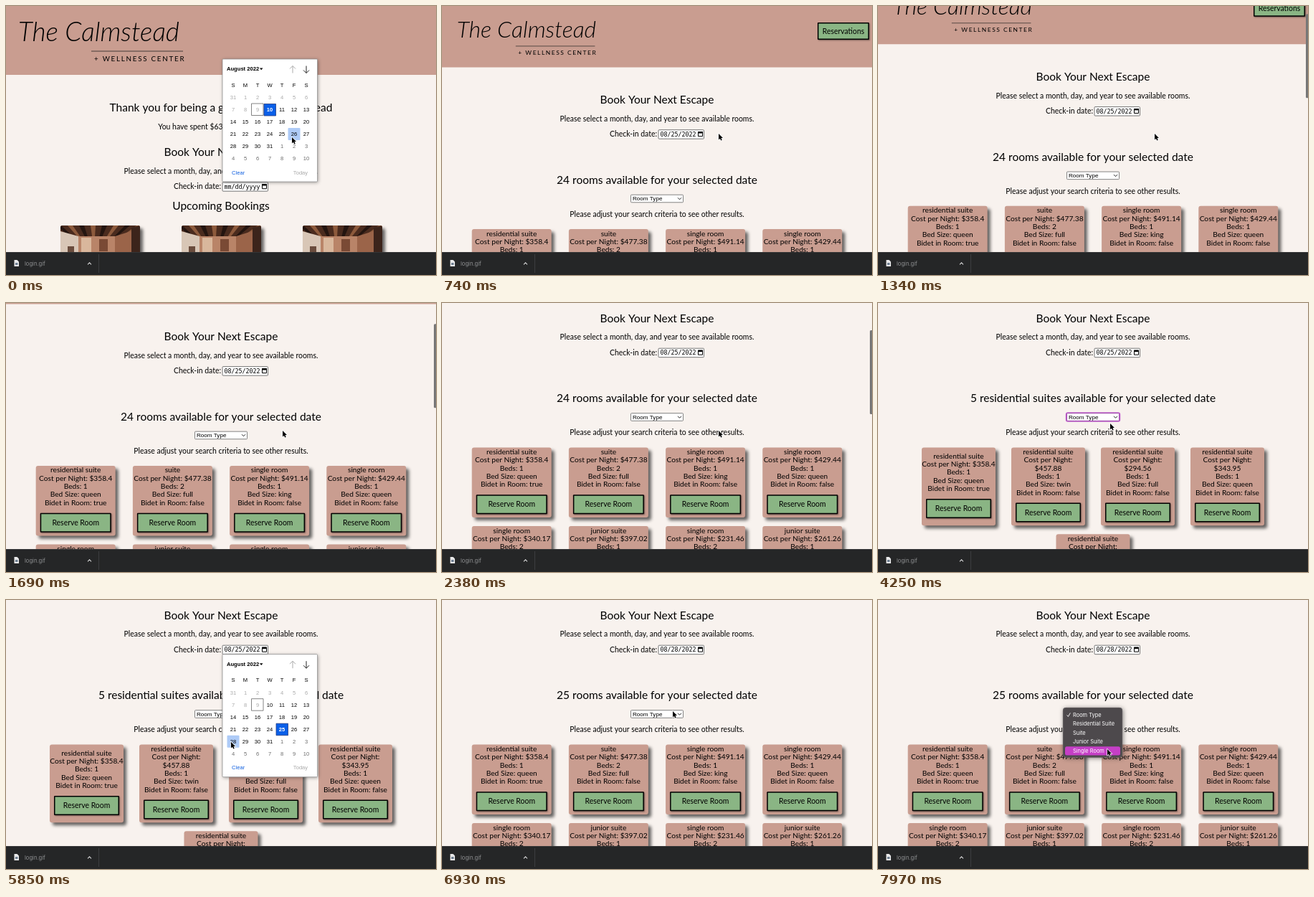
Recreate the animation shown at these times as an HTML page with a canvas. Size 600 by 375 pixels, loop 8 s.

```html
<!DOCTYPE html>
<html lang="en">
<head>
<meta charset="utf-8">
<title>Room booking</title>
<style>
html, body { margin: 0; width: 100%; height: 100%; overflow: hidden; background: #f8f2ee; }
canvas { display: block; width: 600px; height: 375px; }
</style>
</head>
<body>
<canvas id="stage" width="600" height="375"></canvas>
<script>
const ctx = document.getElementById('stage').getContext('2d');
const LOOP = 8000;
const PAGE = '#f8f2ee', ROSE = '#c99d90', GREEN = '#8ab584';
const LATO = 'Lato, sans-serif', ARIAL = '"Liberation Sans", sans-serif';
const UI = 'Inter, sans-serif', MONO = '"DejaVu Sans Mono", monospace';
const BODY = 10.45, TITLE = 15.5, LINE = 11.3;

const PICK_FIRST = 450, PICK_TYPE = 3950, PICK_SECOND = 6150;
const MENU_1 = 3250, CALENDAR_2 = 5350, MENU_2 = 7150;
const BAR_TOP = 343;

const scrollKeys = [[1040, 0], [1340, 32], [1690, 84], [2000, 106], [2150, 109.5]];
const cursorKeys = [
  [80, 399, 183], [250, 386, 178], [2700, 386, 178], [3180, 330, 157], [3350, 330, 157],
  [3700, 324, 168], [4350, 324, 168], [5080, 357, 82], [5240, 361, 66], [5400, 361, 66],
  [5800, 314, 198], [6200, 314, 198], [6780, 322, 155], [7250, 322, 155], [7900, 320, 208]
];

const allRooms = [
  ['residential suite', '$358.4', 1, 'queen', true],
  ['suite', '$477.38', 2, 'full', false],
  ['single room', '$491.14', 1, 'king', false],
  ['single room', '$429.44', 1, 'queen', false],
  ['single room', '$340.17', 2, 'queen', false],
  ['junior suite', '$397.02', 1, 'queen', false],
  ['single room', '$231.46', 2, 'twin', false],
  ['junior suite', '$261.26', 1, 'full', false]
];
const suites = [
  allRooms[0],
  ['residential suite', '$457.88', 1, 'twin', false],
  ['residential suite', '$294.56', 1, 'full', false],
  ['residential suite', '$343.95', 1, 'queen', false],
  ['residential suite', '$412.73', 1, 'king', false]
];

const clamp = v => Math.max(0, Math.min(1, v));
const smooth = p => p * p * (3 - 2 * p);

// Value list at time t along [time, ...values] keys.
function along(keys, t, ease = p => p) {
  if (t <= keys[0][0]) return keys[0].slice(1);
  for (let i = 1; i < keys.length; i++) {
    const a = keys[i - 1], b = keys[i];
    if (t < b[0]) {
      const p = ease((t - a[0]) / (b[0] - a[0]));
      return a.slice(1).map((v, k) => v + (b[k + 1] - v) * p);
    }
  }
  return keys[keys.length - 1].slice(1);
}

// Text centred vertically on y.
function text(str, x, y, { size = BODY, font = LATO, color = '#000', align = 'center', style = '', spacing = 0 } = {}) {
  ctx.font = `${style} ${size}px ${font}`;
  ctx.letterSpacing = spacing + 'px';
  ctx.textAlign = align;
  ctx.fillStyle = color;
  ctx.fillText(str, x, y + size * 0.35);
}

function box(x, y, w, h, fill, { radius = 0, stroke, width = 1 } = {}) {
  ctx.beginPath();
  ctx.roundRect(x, y, w, h, radius);
  if (fill) { ctx.fillStyle = fill; ctx.fill(); }
  if (stroke) { ctx.strokeStyle = stroke; ctx.lineWidth = width; ctx.stroke(); }
}

function line(points, color, width = 1) {
  ctx.beginPath();
  points.forEach(([x, y]) => ctx.lineTo(x, y));
  ctx.strokeStyle = color;
  ctx.lineWidth = width;
  ctx.stroke();
}

function shape(points, fill) {
  ctx.beginPath();
  points.forEach(([x, y]) => ctx.lineTo(x, y));
  ctx.closePath();
  ctx.fillStyle = fill;
  ctx.fill();
}

function withShadow(offset, blur, color, draw) {
  ctx.save();
  ctx.shadowOffsetX = ctx.shadowOffsetY = offset;
  ctx.shadowBlur = blur;
  ctx.shadowColor = color;
  draw();
  ctx.restore();
}

function button(label, x, y, w, h) {
  withShadow(1, 2, 'rgba(0,0,0,.45)', () => box(x, y, w, h, '#000', { radius: 1 }));
  box(x + 1.5, y + 1.5, w - 3, h - 3, GREEN);
  text(label, x + w / 2, y + h / 2);
}

function header(home, scroll) {
  const k = home ? 1 : 0.864;
  box(0, -scroll, 600, home ? 96 : 85.5, ROSE);
  ctx.save();
  ctx.translate(0, home ? 0 : 1.5 - scroll);
  ctx.scale(k, k);
  text('The Calmstead', home ? 17 : 24, 36, { size: 37, style: 'italic 300', align: 'left' });
  line([[119, 63], [247, 63]], '#222', 0.8);
  text('+ WELLNESS CENTER', 123, 73.5, { size: 9.8, align: 'left', spacing: 1.75 });
  ctx.restore();
  if (!home) button('Reservations', 524, 23 - scroll, 72, 24);
}

function photo(x, y) {
  const w = 111, h = 80;
  withShadow(4, 4, 'rgba(0,0,0,.6)', () => box(x, y, w, h, '#8a5f48', { radius: 3 }));
  ctx.save();
  ctx.beginPath();
  ctx.roundRect(x, y, w, h, 3);
  ctx.clip();
  ctx.translate(x, y);
  box(0, 0, w, 17, '#4a2b1e');
  for (let i = 0; i < 8; i++) {
    const a = i * 16 - 6;
    shape([[a, 0], [a + 7, 0], [48 + (a - 48) * 0.65 + 4, 15], [48 + (a - 48) * 0.65, 15]], i % 2 ? '#8d5a3c' : '#241510');
  }
  box(0, 15, w, 40, '#b98468');
  shape([[0, 8], [25, 15], [25, 40], [0, 40]], '#d8c6b6');
  box(29, 17, 14, 21, '#d9b79c');
  box(54, 19, 12, 17, '#7a4a35');
  shape([[76, 15], [w, 4], [w, 42], [76, 38]], '#9b6449');
  shape([[99, 3], [w, 0], [w, 42], [99, 40]], '#3c241b');
  box(10, 29, 9, 10, '#6a4c3d');
  ctx.restore();
}

function dateInput(y, value) {
  text('Check-in date:', 300, y, { align: 'right' });
  box(302, y - 6, 63.5, 12.5, '#fff', { stroke: '#767676', radius: 1 });
  text(value, 304.5, y + 0.3, { size: 8.3, font: MONO, align: 'left' });
  box(357.5, y - 3, 6, 6, null, { stroke: '#000' });
  box(357, y - 3.5, 7, 2.3, '#000');
}

function bookingForm(y, value) {
  text('Book Your Next Escape', 300, y, { size: TITLE });
  text('Please select a month, day, and year to see available rooms.', 300, y + 26.2);
  dateInput(y + 47.7, value);
}

function home() {
  header(true, 0);
  text('Thank you for being a guest at The Calmstead', 300, 142, { size: TITLE });
  text('You have spent $6374.28 on bookings', 300, 168);
  bookingForm(204, 'mm/dd/yyyy');
  text('Upcoming Bookings', 300, 279, { size: TITLE });
  [76, 245, 414].forEach(x => photo(x, 306));
}

function card([type, cost, beds, size, bidet], x, y, w, h) {
  withShadow(4, 4, 'rgba(0,0,0,.6)', () => box(x, y, w, h, ROSE, { radius: 3 }));
  const wraps = w < 110 && cost.length > 6;
  const rows = [type, ...(wraps ? ['Cost per Night:', cost] : ['Cost per Night: ' + cost]),
    'Beds: ' + beds, 'Bed Size: ' + size, 'Bidet in Room: ' + bidet];
  const top = y + (h - rows.length * LINE - 41) / 2;
  rows.forEach((row, i) => text(row, x + w / 2, top + 6 + i * LINE, { size: 10.2 }));
  button('Reserve Room', x + 6, top + rows.length * LINE + 9.3, w - 12, 27);
}

function roomGrid(rooms, narrow, top) {
  const w = narrow ? 103 : 111, h = narrow ? 108.8 : 97.5, pitch = narrow ? 125 : 135.2;
  rooms.forEach((room, i) => {
    const row = Math.floor(i / 4);
    const inRow = Math.min(4, rooms.length - row * 4);
    const x = 300 - ((inRow - 1) * pitch + w) / 2 + (i % 4) * pitch;
    card(room, x, top + row * (h + 12), w, h);
  });
}

function results(t, scroll) {
  const narrow = t >= PICK_TYPE && t < PICK_SECOND;
  const found = narrow ? '5 residential suites' : t < PICK_SECOND ? '24 rooms' : '25 rooms';
  header(false, scroll);
  bookingForm(131 - scroll, t < PICK_SECOND ? '08/25/2022' : '08/28/2022');
  text(found + ' available for your selected date', 300, 242.5 - scroll, { size: TITLE });

  const y = 268.5 - scroll;
  const focused = t >= PICK_TYPE && t < CALENDAR_2;
  if (focused) box(263, y - 5.5, 74, 11, null, { stroke: '#c060cc', width: 2.5, radius: 2 });
  box(263.5, y - 5.3, 73, 10.6, '#fff', { stroke: focused ? '#9a45a8' : '#767676', width: 0.9, radius: 1 });
  text('Room Type', 266, y, { size: 8.1, font: ARIAL, align: 'left' });
  line([[329, y - 1.2], [331.5, y + 1.3], [334, y - 1.2]], '#222');

  text('Please adjust your search criteria to see other results.', 300, 290 - scroll);
  roomGrid(narrow ? suites : allRooms, narrow, 311 - scroll);
}

function arrow(x, y, dir, color) {
  line([[x, y - 5 * dir], [x, y + 5 * dir]], color);
  line([[x - 4, y + dir], [x, y + 5 * dir], [x + 4, y + dir]], color);
}

function calendar(top, chosen, [cx, cy]) {
  const small = { size: 7.6, font: ARIAL };
  withShadow(1, 5, 'rgba(0,0,0,.4)', () => box(302, top, 132.5, 171, '#fff', { radius: 1 }));
  box(302, top, 132.5, 171, null, { stroke: '#8a8a8a', width: 0.7, radius: 1 });
  text('August 2022', 308, top + 13.5, { ...small, style: 'bold', align: 'left' });
  shape([[354, top + 12.5], [358.5, top + 12.5], [356.2, top + 15.2]], '#000');
  arrow(400, top + 14.5, -1, '#aaa');
  arrow(419, top + 14.5, 1, '#222');
  [...'SMTWTFS'].forEach((d, i) => text(d, 317 + i * 17, top + 36, small));

  const col = Math.floor((cx - 308.5) / 17), row = Math.floor((cy - top - 45) / 17);
  const hover = col >= 0 && col < 7 && row >= 0 && row < 6 ? row * 7 + col : -1;
  for (let i = 0; i < 42; i++) {
    const x = 317 + (i % 7) * 17, y = top + 53.5 + Math.floor(i / 7) * 17;
    const day = i === 0 ? 31 : i > 31 ? i - 31 : i;
    const picked = i === chosen;
    if (picked) box(x - 8, y - 8, 16.5, 16.5, '#0a5fe8', { stroke: '#263c80', width: 0.8 });
    else if (i === hover && i > 9) box(x - 8.5, y - 8.5, 17, 17, '#aecbf7', { radius: 1 });
    if (i === 9) box(x - 8.5, y - 8.5, 16.5, 16.5, null, { stroke: '#777', width: 0.9 });
    const color = picked ? '#fff' : i <= 9 ? '#aaa' : i > 31 ? '#6c6c6c' : '#000';
    text(day, x, y, { ...small, color, style: picked ? 'bold' : '' });
  }
  text('Clear', 315, top + 158, { ...small, color: '#1060e0', align: 'left' });
  text('Today', 411, top + 158, { ...small, color: '#aaa' });
}

function menu([, cy]) {
  const items = ['Room Type', 'Residential Suite', 'Suite', 'Junior Suite', 'Single Room'];
  const active = Math.max(0, Math.min(4, Math.round((cy - 160) / 12.6)));
  withShadow(1, 6, 'rgba(0,0,0,.5)', () => box(258, 150, 83, 69.5, '#4d494c', { radius: 4 }));
  box(258.3, 150.3, 82.4, 68.9, null, { stroke: '#6c686b', width: 0.6, radius: 4 });
  box(261, 153.8 + active * 12.6, 77, 12.4, '#c53fc6', { radius: 2.5 });
  line([[263.6, 160.4], [265.4, 162.5], [268.3, 157.4]], '#fff', 0.9);
  items.forEach((item, i) => text(item, 272, 160 + i * 12.6, { size: 7.45, font: UI, color: '#fff', align: 'left' }));
}

function scrollbar(t, scroll) {
  ctx.globalAlpha = clamp((t - 1040) / 80) * clamp((3150 - t) / 250);
  box(597, scroll * 0.347, 4, 117, '#777', { radius: 1.5 });
  ctx.globalAlpha = 1;
}

function downloadBar() {
  box(0, BAR_TOP, 600, 32, '#252627');
  box(0, BAR_TOP, 600, 0.7, '#3a3a3b');
  shape([[11.5, 354], [15.5, 354], [18, 356.5], [18, 363], [11.5, 363]], '#e9e9ea');
  box(13, 358, 3.5, 3, '#6f7f92');
  text('login.gif', 26, 359, { size: 7.6, font: UI, color: '#8f9092', align: 'left' });
  line([[114, 360.3], [116.5, 357.8], [119, 360.3]], '#d5d5d5', 1.1);
  line([[129.5, 346], [129.5, 372]], '#444547', 0.8);
}

function cursor([x, y]) {
  ctx.save();
  ctx.translate(x, y);
  ctx.beginPath();
  [[0, 0], [0, 8.4], [1.9, 6.7], [3.2, 9.6], [4.7, 8.9], [3.5, 6.1], [6, 6]].forEach(([px, py]) => ctx.lineTo(px, py));
  ctx.closePath();
  ctx.strokeStyle = '#fff';
  ctx.lineWidth = 1.3;
  ctx.stroke();
  ctx.fillStyle = '#000';
  ctx.fill();
  ctx.restore();
}

function render(t) {
  const [scroll] = along(scrollKeys, t);
  const tip = along(cursorKeys, t, smooth);
  box(0, 0, 600, 375, PAGE);
  if (t < PICK_FIRST) home();
  else results(t, scroll);
  scrollbar(t, scroll);
  downloadBar();
  if (t < PICK_FIRST) calendar(74, 10, tip);
  if (t >= CALENDAR_2 && t < PICK_SECOND) calendar(75.7, 25, tip);
  if ((t >= MENU_1 && t < PICK_TYPE) || t >= MENU_2) menu(tip);
  cursor(tip);
}

function tick() {
  render(performance.now() % LOOP);
  requestAnimationFrame(tick);
}
tick();
</script>
</body>
</html>
```
